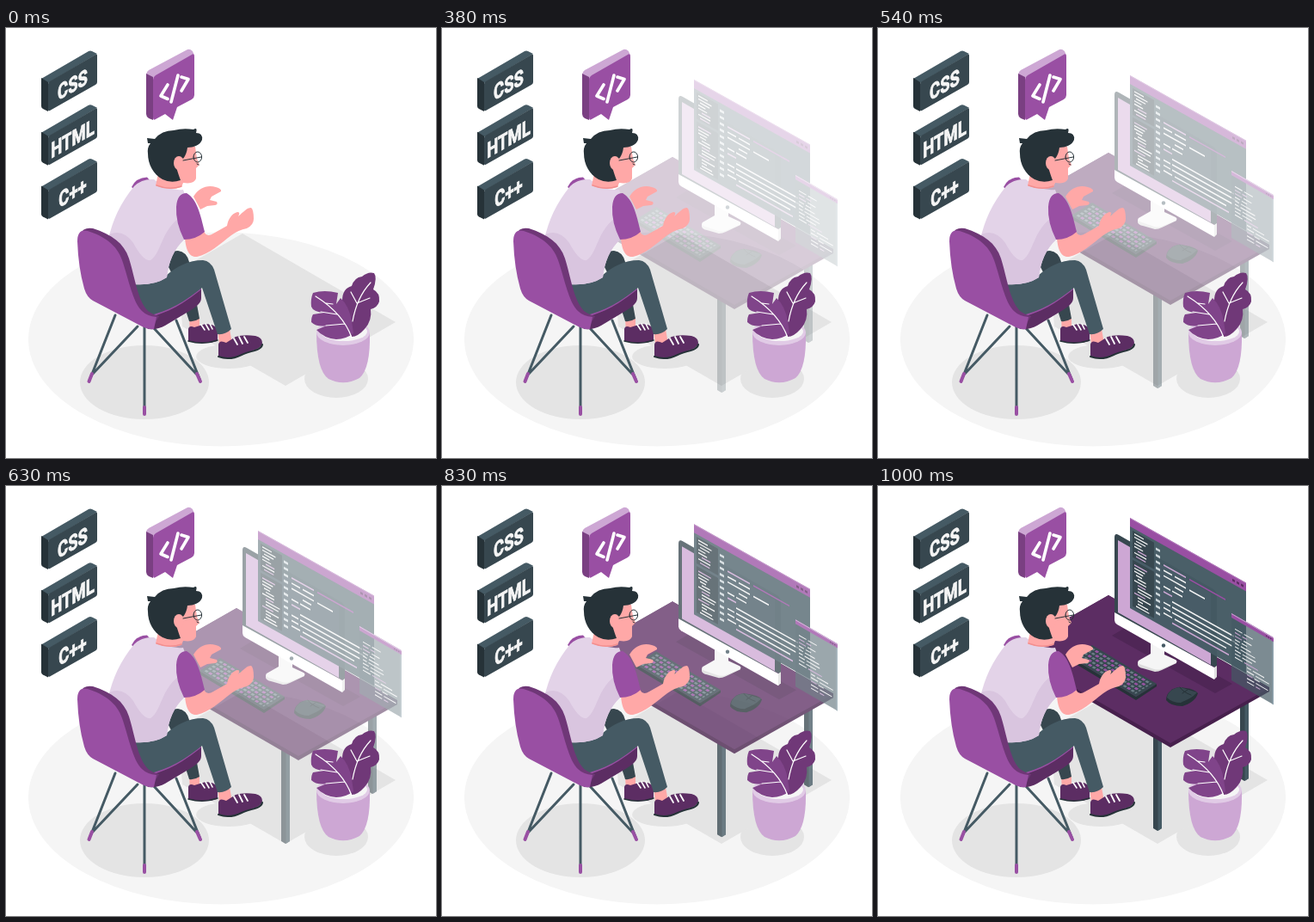
Write an HTML page that moves like this. It is 500x500 px and loops after 1.04 s.

```html
<!DOCTYPE html>
<html lang="en">
<head>
<meta charset="utf-8">
<style>
  html, body { margin: 0; width: 100%; height: 100%; overflow: hidden; background: #fff; }
  svg { display: block; width: 100%; height: 100%; }
  .label { font: 700 25px Roboto, Inter, sans-serif; fill: #f5f5f5; stroke: #f5f5f5; stroke-width: .9; text-anchor: middle; }
  .ink { fill: #263238; } .slate { fill: #37474f; } .steel { fill: #455a64; }
  .deep { fill: #5c2d63; } .plum { fill: #994fa3; } .lilac { fill: #cda7d4; }
  .skin { fill: #ffa8a7; } .shade { fill: #e4e4e4; } .paper { fill: #f5f5f5; }
  .line { fill: none; stroke-linecap: round; stroke-linejoin: round; }
</style>
</head>
<body>
<svg viewBox="0 0 500 500">
  <!-- floor and shadows -->
  <ellipse class="paper" cx="250" cy="362" rx="224" ry="124.5"/>
  <g class="shade">
    <ellipse cx="161" cy="412" rx="75" ry="43"/>
    <ellipse cx="384" cy="408" rx="37" ry="22"/>
    <ellipse cx="259" cy="382" rx="38" ry="14"/>
    <path d="M200 282L275 239L453 342L325 416L205 347z"/>
  </g>

  <g id="badges"></g>

  <!-- speech bubble -->
  <path class="lilac" d="M163 54Q163 51 166 49L211 25Q214 24 217 27L219 32L172 60z"/>
  <path fill="#7a3f82" d="M163 53L171 57V107L166 105Q163 103 163 100z"/>
  <path class="plum" d="M171 60Q171 57 174 55L216 31Q219 29 219 33V78Q219 81 216 83L199 92L194 107L185 100L174 106Q171 108 171 104z"/>
  <path class="line" stroke="#fff" stroke-width="3.600" d="M188 66L180 79L188 82.500M200 55L192 86M204 57L212 59.500L204 73"/>

  <!-- desk, rises and fades in -->
  <g id="desk">
    <path class="slate" d="M320 285H330V398L325 401L320 398zM421 235H431V340L426 343L421 340z"/>
    <path class="steel" d="M325.500 290H330V398L325.500 401zM426.500 240H431V340L426.500 343z"/>
    <path fill="#47204d" d="M155 191L268 127L455 234V239L340 304L155 197z"/>
    <path class="deep" d="M268 127L455 235L340 299L155 192z"/>
    <path fill="#4f2656" d="M272 174L292 162L412 230L392 241z"/>

    <!-- keyboard -->
    <path class="ink" d="M225 200L300 245L324 230V233L300 249L225 204z"/>
    <g id="keys" transform="matrix(1 .6 -1 .625 249 185)">
      <rect class="slate" width="75" height="24"/>
    </g>

    <!-- mouse -->
    <path class="ink" d="M335 249C335 240 343 234 352 234Q369 236 372 241C370 249 361 254 354 256Q340 256 335 249z"/>
    <path class="slate" d="M336 246C337 239 344 234 352 234L371 240C366 246 358 249 352 252Q342 252 336 246z"/>
    <path class="line" stroke="#263238" d="M351 234Q355 240 364 243M354 241L360 237"/>

    <!-- monitor -->
    <path fill="#dedede" d="M302 205V208Q303 211 308 212L322 216Q326 216 330 214L347 206V203z"/>
    <path class="paper" d="M303 203L317 195V180L333 186V196L346 202Q349 204 346 206L329 213Q325 214 321 213L304 207Q301 205 303 203z"/>
    <path class="slate" d="M275 60Q275 54 280 57L390 120Q394 123 394 127V212L275 150z"/>
    <path class="lilac" d="M279 63L387 125V208L279 147z"/>
    <path fill="#fff" d="M275 147L391 211V225L278 161Q275 159 275 156z"/>
    <path fill="#e0e0e0" d="M391 211L394 209V222L391 225z"/>
    <circle class="steel" cx="332" cy="185.500" r="2.200"/>

    <g id="editor" transform="matrix(1 .56 0 1 293 37)">
      <rect class="steel" y="8" width="135" height="97" opacity=".97"/>
      <path class="slate" d="M3 13H28V44H3zM3 47H28V101H3z"/>
      <rect class="plum" width="135" height="10"/>
      <path stroke="#b57fbd" d="M0 .5H135"/>
      <path stroke="#5c2d63" stroke-width="2.600" stroke-dasharray="3 2" d="M119 5.500H132"/>
    </g>
    <g id="popup" transform="matrix(1 .577 0 1 411 148)">
      <rect class="steel" width="49" height="78" opacity=".7"/>
      <path fill="#90a4ae" d="M47.500 5H49V78H47.500z"/>
      <rect class="plum" width="49" height="5"/>
      <path stroke="#cda7d4" d="M0 .5H49"/>
      <path stroke="#5c2d63" stroke-width="1.500" stroke-dasharray="1.500 1" d="M40 3H47"/>
    </g>
  </g>

  <!-- far leg and foot -->
  <path class="skin" d="M213 338H225V354H214z"/>
  <path class="slate" d="M186 272Q188 259 200 259Q210 260 213 272L225 338Q219 342 213 341L200 300z"/>
  <path class="deep" d="M212 350Q213 345 219 348L232 344Q242 344 246 350V364Q229 369 212 364z"/>
  <path class="line" stroke="#263238" stroke-width="1.500" d="M212 364Q230 369 246 363"/>
  <path class="line" stroke="#fff" stroke-width="1.600" d="M227 345L231 351M232 344L236 351M237 344L240 350"/>

  <!-- chair legs -->
  <path class="line" stroke="#455a64" stroke-width="3" d="M127 334L99 405M153 347L101 402M161 346V444M171 348L221 402M198 340L225 408"/>
  <path class="line" stroke="#994fa3" stroke-width="4" d="M100 402L96.500 411M161 441V449M222 402L226 411"/>

  <!-- far hand -->
  <path class="skin" d="M218 196C224 186 234 182 244 185Q251 187 250 190L239 196L237 200L245 202Q247 205 243 206L234 207L226 211z"/>

  <!-- near leg and foot -->
  <path class="skin" d="M246 350H260L263 367H248z"/>
  <path class="deep" d="M247 368Q248 362 256 366L267 359Q276 356 290 358Q298 360 298 366C297 374 285 375 274 380Q260 388 247 382z"/>
  <path class="line" stroke="#263238" stroke-width="2" d="M247 382Q260 387 274 380C285 375 297 375 298 368"/>
  <path class="line" stroke="#fff" stroke-width="1.800" d="M265 361L269 368M271 359L275 367M277 359L281 366"/>
  <path class="plum" d="M145 300L227 302V310L170 350L140 335z"/>
  <path class="deep" d="M160 338C190 331 207 320 227 304V314C227 320 221 324 215 328L185 346Q177 351 165 350z"/>
  <path class="steel" d="M146 294L186 288C199 277 212 270 229 270Q238 271 242 281L262 350Q255 357 246 356L228 302C209 317 190 330 163 335Q148 318 146 294z"/>

  <!-- shirt -->
  <path class="plum" d="M146 185Q151 174 164 173.500L168 178L150 188z"/>
  <path fill="#e3d3e8" d="M119 246Q126 212 149 184Q158 175 172 176Q188 190 206 188L212 205L207 246Q190 262 187 290Q172 300 148 298z"/>
  <path fill="#d9c5df" d="M120 240Q136 233 148 250Q160 272 168 270C180 263 180 238 200 222L207 246Q190 262 187 290Q172 300 148 298z"/>

  <!-- head -->
  <path class="skin" d="M178 165L202 136L220 138L222 152L225 159L221 163V175Q219 182 206 180L204 185Q190 190 174 183z"/>
  <path class="line" stroke="#f28f8f" stroke-width="1.500" d="M175 183Q190 189 204 184"/>
  <path class="ink" d="M165 134L164 128L173 129Q181 119 195 119Q206 116 218 118Q223 115 221 122Q229 122 228 130C226 136 218 139 211 139Q210 147 206 152L198 162Q201 172 203 177Q192 181 182 176C171 170 165 158 165 146Q164 139 168 134z"/>
  <ellipse class="skin" cx="201" cy="157" rx="6" ry="8"/>
  <path class="line" stroke="#263238" d="M206 154L227 150M218 150A4.800 6 0 1 1 227.600 150A4.800 6 0 1 1 218 150M222 158L224 159"/>

  <!-- near arm -->
  <path class="skin" d="M208 244L230 236Q233 244 241 239L257 230C258 223 262 216 269 214Q273 214 270 219C276 214 280 209 285 209Q288 211 288 222Q288 229 280 233Q270 235 262 241C249 251 236 263 222 266C212 267 209 256 208 244z"/>
  <path class="plum" d="M198 208Q199 192 210 192C222 199 226 216 231 237Q221 246 207 246Q197 226 198 208z"/>

  <!-- chair back -->
  <path fill="#6f3777" d="M86 240Q90 231 101 233C123 240 137 250 143 268C150 290 153 317 165 329Q172 334 178 335L170 349L140 330z"/>
  <path class="plum" d="M83 248Q83 233 95 236C114 242 129 252 135 270C143 293 147 318 158 329Q164 335 175 336L172 350Q167 351 160 348L101 317Q94 313 91 303Q84 278 83 248z"/>

  <!-- plant -->
  <path class="lilac" d="M361 354H423Q424 396 411 407Q393 417 375 408Q361 398 361 354z"/>
  <ellipse fill="#e1cbe6" cx="392" cy="354" rx="31" ry="15"/>
  <ellipse class="paper" cx="393" cy="353" rx="27" ry="11"/>
  <path fill="#703878" d="M428 285Q432 290 427 304Q435 308 434 318Q432 325 424 327Q426 340 417 350Q409 359 402 359Q395 344 391 317Q391 303 402 300Q405 290 414 289Q421 283 428 285z"/>
  <path fill="#80448a" d="M357 308Q370 304 386 308L384 321L389 314Q399 323 402 341L404 355Q395 362 384 362Q370 361 361 351L373 346Q361 348 355 342Q355 336 357 333L370 331Q357 330 355 324Q354 315 357 308z"/>
  <path class="line" stroke="#fff" stroke-width="1.200" d="M360 312Q392 332 402 360M372 320L380 321M366 330L385 333M372 346L394 344M424 296Q408 313 403 341M401 307L408 320L423 314"/>
</svg>
<script>
const $ = id => document.getElementById(id);
const add = (id, html) => $(id).insertAdjacentHTML('beforeend', html);
const bar = (x, y, w, color, size = 1.5, extra = '') =>
  `<path stroke="${color}" stroke-width="${size}" ${extra} d="M${x} ${y}h${w}"/>`;

let seed = 11;
const rnd = () => (seed = seed * 16807 % 2147483647) / 2147483647;
const tint = () => rnd() < .25 ? '#cda7d4' : '#f5f5f5';

['CSS', 'HTML', 'C++'].forEach((word, i) => add('badges', `
  <g transform="translate(0 ${i * 62.7})">
    <path class="steel" d="M41 59L96 27Q98 26 100 27L106 30L49 64z"/>
    <path class="ink" d="M41 58L49 63V97L43 94Q41 93 41 91z"/>
    <path class="slate" d="M49 65Q49 63 51 62L104 31Q106 30 106 32V63Q106 65 104 66L51 96Q49 97 49 95z"/>
    <text class="label" transform="matrix(.74 -.428 0 1 77.500 74.500)">${word}</text>
  </g>`));

for (let r = 0; r < 5; r++) {
  const y = 3.5 + r * 4.2;
  add('keys', bar(3, y, 69, '#6b7d86', 2.3, 'stroke-dasharray="3 1.500"'));
  add('keys', bar(7.5 + r % 2 * 4.5, y, 60, '#994fa3', 2.3, 'stroke-dasharray="3 6"'));
}

// file tree and line markers
for (let y = 16; y < 99; y += 3.6)
  if (y < 42 || y > 49) add('editor', bar(5 + Math.floor(rnd() * 3) * 2, y, 6 + rnd() * 11, tint(), 1.4));
for (let y = 19; y < 100; y += 7.4) add('editor', bar(30, y, 5, '#cfd8dc', 2.8));

// code: [indent, length, ...] per row
const code = [
  [39, 26], [39, 10, 52, 13], [39, 26, 69, 18], [52, 10], [39, 8, 49, 12], [39, 10],
  [49, 72], [39, 8, 49, 76], [39, 8, 49, 70], [39, 10, 52, 60], [49, 66]
];
code.forEach((row, i) => {
  for (let k = 0; k < row.length; k += 2)
    add('editor', bar(row[k], 33 + i * 6.2, row[k + 1], i % 5 ? '#f5f5f5' : '#cda7d4', 1.7));
});
add('editor', bar(69, 33, 42, '#994fa3', 1.6));

for (let i = 0; i < 14; i++) {
  const x = i < 9 ? 4 : 18, y = 16 + i * 4.1, first = 4 + rnd() * 5;
  add('popup', bar(x, y, first, tint(), 1.1));
  add('popup', bar(x + first + 2, y, 5 + rnd() * 12, tint(), 1.1));
}

const desk = $('desk');
function draw() {
  const t = performance.now() % 1040;
  const p = Math.min(1, t / 1000) ** 1.5;
  desk.setAttribute('opacity', p);
  desk.setAttribute('transform', `translate(0 ${30 * (1 - p)})`);
  requestAnimationFrame(draw);
}
draw();
</script>
</body>
</html>
```
